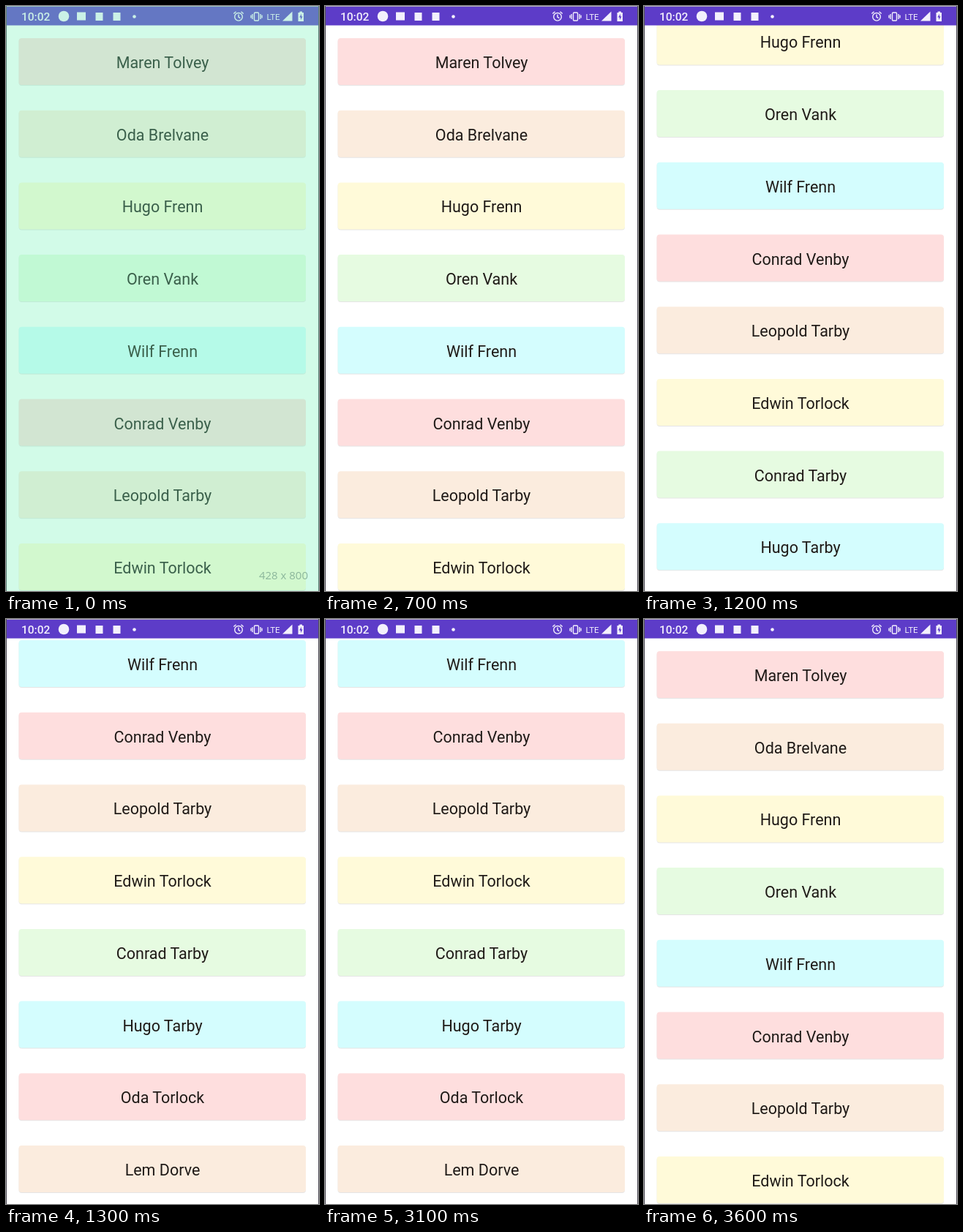
Animation, 428 px wide and 800 px high, one loop 3.7 s. Source, as an HTML page:

```html
<!DOCTYPE html>
<html lang="en">
<head>
<meta charset="utf-8">
<title>Scrolling name list</title>
<style>
  html, body { margin: 0; width: 100%; height: 100%; overflow: hidden; background: #fff; }
  svg { display: block; width: 100vw; height: 100vh; }
  text { font-family: Roboto, sans-serif; }
  .name { font-size: 21.5px; fill: #1f1a17; text-anchor: middle; }
</style>
</head>
<body>
<svg viewBox="0 0 428 800">
  <rect width="428" height="800" fill="#fff"/>
  <g id="list"></g>

  <g id="status" fill="#f3f0fc">
    <rect width="428" height="26.500" fill="#5d3cc8"/>
    <rect width="428" height="1" fill="#b5b1bd"/>
    <text x="21" y="20" font-size="15.5" font-weight="500">10:02</text>
    <circle cx="79" cy="14" r="7.3"/>
    <rect x="97" y="8.5" width="12" height="11"/>
    <rect x="122.5" y="9" width="10" height="11"/>
    <rect x="146.5" y="9" width="10" height="11"/>
    <circle cx="175.5" cy="14.5" r="2.3"/>

    <g fill="none" stroke="#f3f0fc" stroke-width="1.4">
      <circle cx="318" cy="14.8" r="5.3"/>
      <path d="M318 11.5v3.6l2.4 1.6M311.3 10.6l3.2-2.9M324.7 10.6l-3.2-2.9"/>
      <rect x="339.5" y="9" width="6" height="11" rx="1"/>
      <path d="M337 11v7M348 11v7M335 12.5v4M350 12.5v4"/>
    </g>
    <text x="356.500" y="18.500" font-size="11.500">LTE</text>
    <path d="M378 20.5L391.5 7.5V20.5Z"/>
    <path d="M399.5 9h2V7.5h3.5V9h2V21h-7.5Z"/>
    <path d="M403.9 10.8l-2.6 4.7h1.7v3.4l2.5-4.6h-1.6Z" fill="#5d3cc8"/>
  </g>

  <path d="M.5 0V800M427.5 0V800" stroke="#54515c"/>

  <g id="intro">
    <rect width="428" height="800" fill="rgb(115,242,183)" fill-opacity=".32"/>
    <text x="413" y="784" font-size="15" text-anchor="end" fill="#8bb69b"
      style="font-family: 'Open Sans', sans-serif">428 x 800</text>
  </g>
</svg>
<script>
  const LOOP = 3700, STEP = 100;
  const FIRST_TOP = 44, PITCH = 98.7, CARD_HEIGHT = 64;
  const MAX_SCROLL = 409.7;
  const colors = ['#fedede', '#fbecde', '#fffad9', '#e6fbe1', '#d4fdfe'];
  const names = [
    'Maren Tolvey', 'Oda Brelvane', 'Hugo Frenn', 'Oren Vank',
    'Wilf Frenn', 'Conrad Venby', 'Leopold Tarby', 'Edwin Torlock',
    'Conrad Tarby', 'Hugo Tarby', 'Oda Torlock', 'Lem Dorve'
  ];
  // [time in ms, scroll offset]: a swipe to the end and a swipe back
  const scrollKeys = [
    [0, 0], [1000, 0], [1100, 12.5], [1200, 225], [1300, MAX_SCROLL],
    [3100, MAX_SCROLL], [3200, 385], [3300, 170], [3400, 0], [LOOP, 0]
  ];

  const list = document.getElementById('list');
  const intro = document.getElementById('intro');

  function card(name, i) {
    const top = FIRST_TOP + i * PITCH;
    const box = `x="17.5" width="392.5" height="${CARD_HEIGHT}" rx="4"`;
    return `<rect ${box} y="${top + 1}" fill="#000" fill-opacity=".1"/>
      <rect ${box} y="${top}" fill="${colors[i % colors.length]}"/>
      <text class="name" x="214" y="${top + 41}">${name}</text>`;
  }
  list.innerHTML = names.map(card).join('');

  function scrollAt(time) {
    const next = scrollKeys.findIndex(([t]) => t > time);
    const [t0, y0] = scrollKeys[next - 1];
    const [t1, y1] = scrollKeys[next];
    return y0 + (y1 - y0) * (time - t0) / (t1 - t0);
  }

  function draw(now) {
    // The screen refreshes ten times a second
    const time = Math.floor((now % LOOP) / STEP) * STEP;
    list.setAttribute('transform', `translate(0 ${-scrollAt(time)})`);
    intro.setAttribute('visibility', time < STEP ? 'visible' : 'hidden');
  }

  const start = performance.now();
  function tick() {
    draw(performance.now() - start);
    requestAnimationFrame(tick);
  }
  tick();
</script>
</body>
</html>
```
